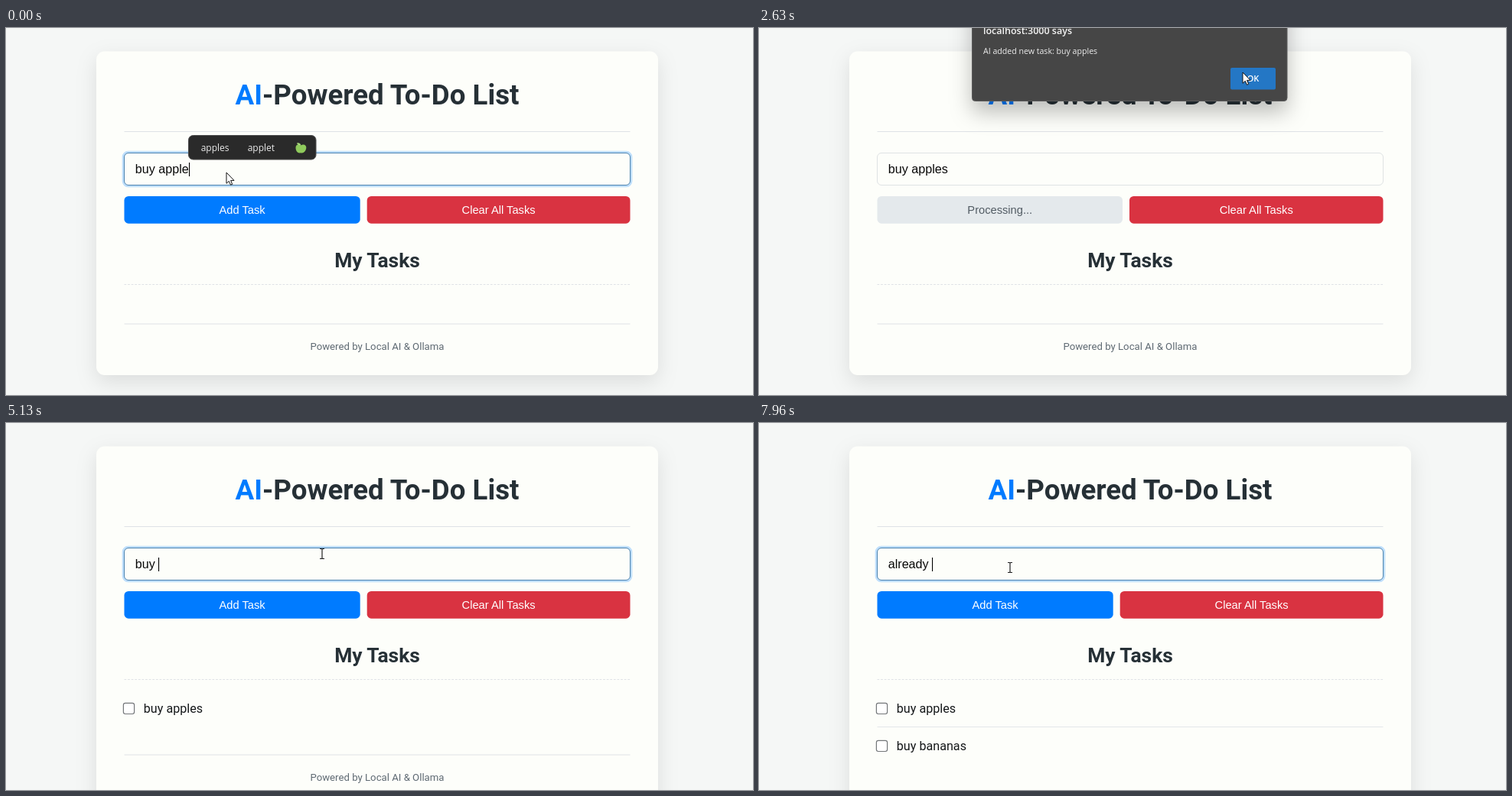
These frames come from a looping animation (976 by 480 pixels, 8000 ms). An HTML page:

```html
<!DOCTYPE html>
<html lang="en">
<head>
<meta charset="utf-8">
<title>To-Do List</title>
<style>
  html, body { margin: 0; width: 100%; height: 100%; overflow: hidden; background: #f5f7f6; }
  svg { display: block; width: 976px; height: 480px; font-family: Roboto, sans-serif; }
  text { white-space: pre; }
  .mid { text-anchor: middle; }
  .arial { font-family: "Liberation Sans", Arial, sans-serif; }
  .system { font-family: "Open Sans", sans-serif; }
  .field { font-size: 16.15px; }
  .button { font-size: 14.68px; fill: #fff; }
  .task { font-size: 16.15px; fill: #15181a; }
  .heading { font-weight: 700; fill: #263036; }
  .rule { stroke: #dfe2e6; fill: none; }
  .check { fill: #fff; stroke: #74777a; stroke-width: 1.2; }
  #card { fill: #fdfefa; filter: drop-shadow(0 9px 13.5px rgba(0, 0, 0, .1)); }
  #dialogBox { fill: #464646; stroke: #5c5c5c; filter: drop-shadow(0 14px 14px rgba(0, 0, 0, .26)); }
</style>
</head>
<body>
<svg viewBox="0 0 976 480">
  <rect id="card" x="118" y="30.5" width="734" rx="11"/>
  <text class="mid heading" x="485" y="100" font-size="36.7"><tspan fill="#007bff">AI</tspan>-Powered To-Do List</text>
  <path class="rule" d="M154.5 135.5H815.5"/>

  <rect id="ring" x="151.7" y="160.7" width="666.6" height="47.6" rx="8" fill="#bfdffc"/>
  <rect id="input" x="154.5" y="163.5" width="661" height="42" rx="5.5" fill="#fdfefa"/>
  <text id="value" class="arial field" x="168.7" y="190.3"></text>
  <rect id="caret" y="176" width="1.1" height="18"/>

  <rect id="add" x="154.5" y="220" height="35.7" rx="5.5"/>
  <text id="addLabel" class="arial button mid" y="242.7"></text>
  <rect id="clear" y="220" height="35.7" rx="5.5" fill="#d93341"/>
  <text id="clearLabel" class="arial button mid" y="242.7">Clear All Tasks</text>

  <text class="mid heading" x="485" y="313" font-size="26.4">My Tasks</text>
  <path class="rule" d="M154.5 335.5H815.5" stroke-dasharray="2.8 1.8"/>
  <g id="apples">
    <rect class="check" x="153.4" y="366.3" width="14.2" height="14.2" rx="2.4"/>
    <text class="task" x="179.8" y="378.8">buy apples</text>
  </g>
  <g id="bananas">
    <path class="rule" d="M154.5 397.5H815.5" stroke-opacity=".8"/>
    <rect class="check" x="153.4" y="415.3" width="14.2" height="14.2" rx="2.4"/>
    <text class="task" x="179.8" y="427.8">buy bananas</text>
  </g>
  <g id="footer">
    <path class="rule" d="M154.5 387H815.5"/>
    <text class="mid" x="485" y="420.5" font-size="13.2" fill="#5f6a73">Powered by Local AI &amp; Ollama</text>
  </g>

  <g id="popup" class="system" font-size="12" fill="#e9e9e9">
    <rect x="238.5" y="140.5" width="166.5" height="31.5" rx="6" fill="#2a2a2a" stroke="#4b4b4b"/>
    <text x="254.7" y="161">apples</text>
    <text x="315.7" y="161">applet</text>
    <path d="M385 153.5C389 151 392.500 153 392.300 156.500C392 161 388.500 164.500 385 163.200C381.500 164.500 378.500 161 378.500 156.500C378.500 153 381.500 151.500 385 153.500Z" fill="#8fca5c"/>
    <path d="M380 150.500Q384 149.500 385.500 153.500Q381 154 380 150.500Z" fill="#a8d87c"/>
  </g>

  <g id="dialog" class="system">
    <rect id="dialogBox" x="278.500" y="-40" width="411.500" height="135.500" rx="4"/>
    <text x="293" y="8" font-size="12.500" font-weight="600" fill="#f4f4f4">localhost:3000 says</text>
    <text id="message" x="293" y="34" font-size="10.600" fill="#ededed"></text>
    <rect x="616" y="52" width="59" height="28.500" rx="2" fill="#2477c5"/>
    <text class="mid" x="645.500" y="70" font-size="11" font-weight="600" fill="#fff">OK</text>
  </g>

  <path id="arrow" d="M0 0V14.300L3.300 11.300L5.500 16.300L7.700 15.300L5.600 10.400H10Z" fill="#fff" stroke="#111"/>
  <path id="beam" d="M-3 -6.500H-1Q0 -6.500 0 -5.500Q0 -6.500 1 -6.500H3M0 -6V6M-3 6.500H-1Q0 6.500 0 5.500Q0 6.500 1 6.500H3" fill="none" stroke="#222" stroke-width="1.200"/>
</svg>
<script>
const LOOP = 8000;
const el = {};
document.querySelectorAll('[id]').forEach(node => el[node.id] = node);

const set = (node, attrs) => {
  for (const name in attrs) node.setAttribute(name, attrs[name]);
};
const show = (node, on) => node.setAttribute('visibility', on ? 'visible' : 'hidden');
const within = (t, [from, to]) => t >= from && t < to;

// Each task runs from submit to list update, with a dialog in between.
const tasks = [
  { text: 'buy apples', submit: 560, dialog: [2150, 3000], done: 3400 },
  { text: 'buy bananas', submit: 5900, dialog: [6060, 6390], done: 6580 }
];

// Typing bursts: text already there, then keys at a steady pace.
const bursts = [
  { at: 0, base: 'buy apple', keys: '', step: 1 },
  { at: 200, base: 'buy apple', keys: 's', step: 1 },
  { at: 3400, base: '', keys: '', step: 1 },
  { at: 4790, base: '', keys: 'buy ', step: 95 },
  { at: 5210, base: 'buy ', keys: 'bananas', step: 85 },
  { at: 6580, base: '', keys: '', step: 1 },
  { at: 7350, base: '', keys: 'already ', step: 80 }
];

// Pointer moves: start, end, destination.
const moves = [
  [0, 0, 288, 189],
  [900, 1500, 385, 290],
  [2200, 2600, 632, 58],
  [3060, 3480, 413, 171],
  [5930, 6180, 632, 58],
  [6430, 6860, 328, 189]
];

function typingAt(t) {
  const burst = bursts.findLast(b => t >= b.at);
  const pressed = Math.min(burst.keys.length, Math.floor((t - burst.at) / burst.step) + 1);
  const lastKey = burst.at + Math.max(0, pressed - 1) * burst.step;
  return { text: burst.base + burst.keys.slice(0, pressed), idle: t - lastKey };
}

function pointerAt(t) {
  let [, , x, y] = moves[0];
  for (const [from, to, endX, endY] of moves.slice(1)) {
    if (t <= from) break;
    const p = Math.min(1, (t - from) / (to - from));
    const ease = p * p * (3 - 2 * p);
    x += (endX - x) * ease;
    y += (endY - y) * ease;
  }
  return [x, y];
}

function draw(t) {
  const busy = tasks.some(task => within(t, [task.submit, task.done]));
  const open = tasks.find(task => within(t, task.dialog));
  const count = tasks.filter(task => t >= task.done).length;
  const grow = [0, 47, 96][count];

  set(el.card, { height: 423.5 + grow });
  set(el.footer, { transform: `translate(0 ${grow})` });
  show(el.apples, count > 0);
  show(el.bananas, count > 1);

  const { text, idle } = typingAt(t);
  el.value.textContent = text || 'What needs to be done today?';
  set(el.value, { fill: text ? '#080808' : '#666a6c' });
  set(el.input, { stroke: busy ? '#dfe2e4' : '#4b82ae' });
  show(el.ring, !busy);
  const textWidth = text ? el.value.getComputedTextLength() : 0;
  set(el.caret, { x: Math.round(168.7 + textWidth) });
  show(el.caret, !busy && idle % 1060 < 530);
  show(el.popup, t < 200);

  const addEnd = busy ? 475 : 462.7;
  const clearStart = addEnd + 9;
  set(el.add, { width: addEnd - 154.5, fill: busy ? '#e4e9ec' : '#007bff' });
  el.addLabel.textContent = busy ? 'Processing...' : 'Add Task';
  set(el.addLabel, { x: (154.5 + addEnd) / 2, style: busy ? 'fill:#525c64' : '' });
  set(el.clear, { x: clearStart, width: 815.5 - clearStart });
  set(el.clearLabel, { x: (clearStart + 815.5) / 2 });

  show(el.dialog, open);
  if (open) el.message.textContent = 'AI added new task: ' + open.text;

  const [x, y] = pointerAt(t);
  const overField = count > 0 && !busy && y > 163 && y < 206;
  const place = { transform: `translate(${x.toFixed(1)} ${y.toFixed(1)})` };
  set(el.arrow, place);
  set(el.beam, place);
  show(el.arrow, !overField);
  show(el.beam, overField);
}

function frame() {
  draw(performance.now() % LOOP);
  requestAnimationFrame(frame);
}
frame();
</script>
</body>
</html>
```
